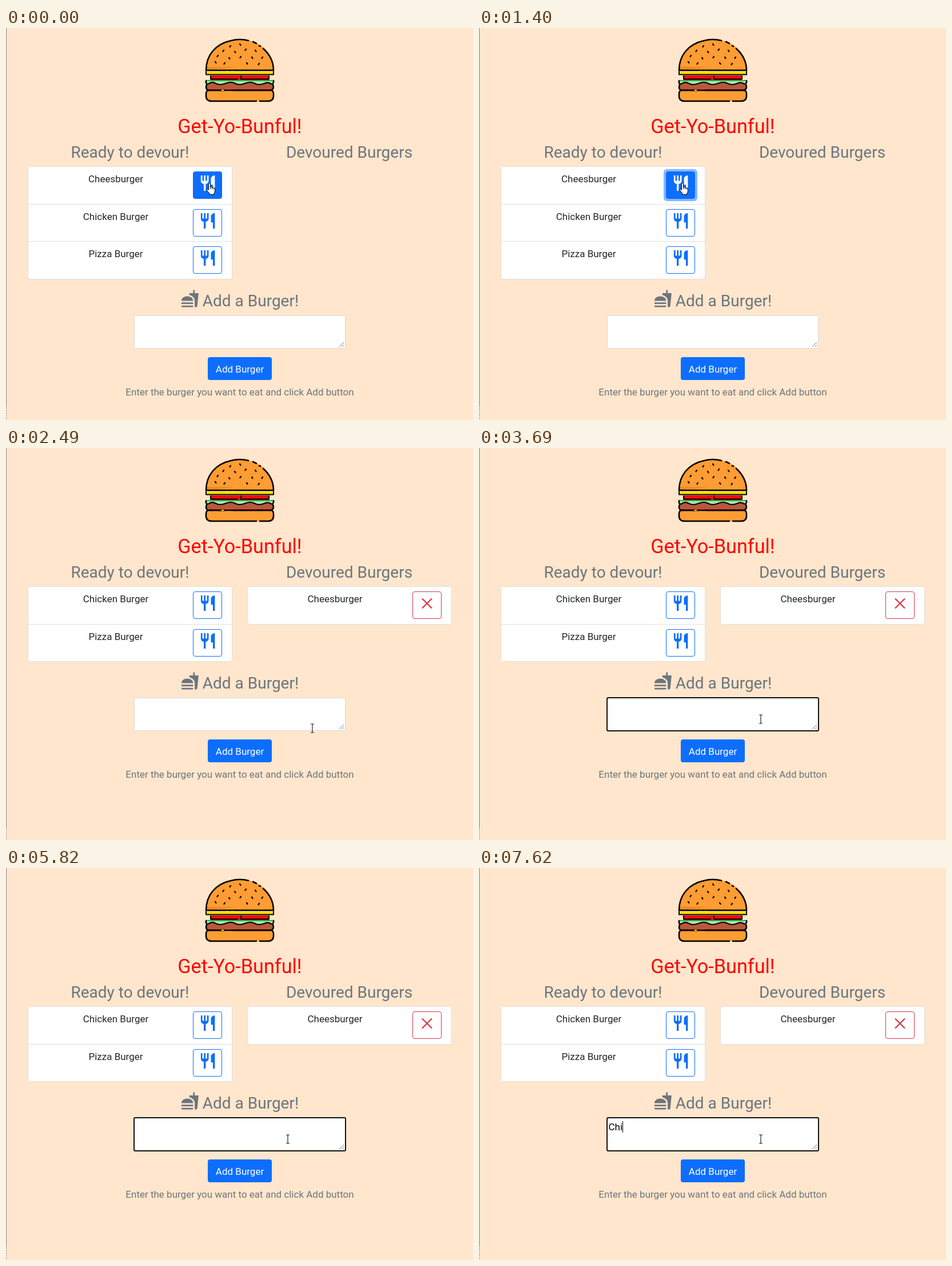
An HTML page for the animation above (8 s loop, 817 px wide and 686 px high).

```html
<!DOCTYPE html>
<html lang="en">
<head>
<meta charset="utf-8">
<title>Burger list</title>
<style>
  html, body { margin: 0; width: 100%; height: 100%; overflow: hidden; background: #ffe6cc; }
  svg { display: block; }
  text { font: 17px Roboto, Arial, sans-serif; fill: #212529; text-anchor: middle; }
  .h1 { font-size: 34.2px; fill: #f00; }
  .h2 { font-size: 28px; fill: #6c757d; }
  .hint { fill: #6c757d; }
  .card { fill: #fff; stroke: #dfdfdf; }
  .eat rect { fill: #fff; stroke: #0d6efd; }
  .eat path { fill: #0d6efd; }
  .eat.hot rect { fill: #0d6efd; }
  .eat.hot path { fill: #fff; }
  .ink { fill: none; stroke: #000; stroke-width: 2.6; stroke-linecap: round; stroke-linejoin: round; }
</style>
</head>
<body>
<svg width="817" height="686" viewBox="0 0 817 686">
  <path d="M.5 0V664" stroke="#857d78"/>
  <path d="M.5 665V686" stroke="#857d78" stroke-dasharray="2 2"/>

  <g id="burger">
    <path d="M350 74C349 44 373 20 409 20S469 44 468 74Z" fill="#ff9c33"/>
    <path d="M351 68H400Q380 72 351 73Z" fill="#f08a24"/>
    <path d="M350 76H468V82H350Z" fill="#ffe000"/>
    <path d="M358 83H460V91H358Z" fill="#f20d0d"/>
    <path d="M350 91H468V97H350Z" fill="#22b04a"/>
    <path d="M352 93H466V98H352Z" fill="#a9e6ae"/>
    <path d="M351 99Q359 92 367 97T384 97T401 97T418 97T435 97T452 97T467 99V109H351Z" fill="#b9573b"/>
    <path d="M354 110H464Q468 110 468 115V119Q468 128 458 128H360Q350 128 350 119V115Q350 110 354 110Z" fill="#ff9c33"/>
    <g class="ink">
      <path d="M424 22Q409 18 394 22C366 28 350 48 350 74H468C468 57 460 45 450 36M432 24L438 27M443 31L445 32"/>
      <path d="M350 76V81.5H468V76M358 84V89.5H405M411 84V89.5H460V84" stroke-width="2"/>
      <path d="M350 92Q348 98 354 98Q360 93 367 97T384 97T401 97T418 97T435 97T452 97Q459 94 464 98Q470 97 468 92" stroke-width="2.2"/>
      <path d="M351 99Q348 108 355 109H388M397 109H463Q470 107 467 99"/>
      <path d="M383 109H354Q350 110 350 115V119Q350 128 360 128H438M444 128H458Q468 128 468 119V115Q468 110 464 109H390"/>
    </g>
    <path d="M384 76H390M394 76H399M377 109H381" stroke="#ffe000" stroke-width="2"/>
    <path id="seeds" class="ink" style="stroke-width:2.2"/>
  </g>

  <text class="h1" x="409" y="184">Get-Yo-Bunful!</text>
  <text class="h2" x="217" y="227">Ready to devour!</text>
  <text class="h2" x="600.5" y="227">Devoured Burgers</text>

  <g id="ready"></g>

  <g id="devoured">
    <rect class="card" x="422.5" y="242.5" width="357" height="66" rx="4"/>
    <text x="575.5" y="270">Cheesburger</text>
    <rect x="711.5" y="251.5" width="50" height="47" rx="3.5" fill="#fff" stroke="#dc3545"/>
    <path d="M728 263.5L745 280.5M745 263.5L728 280.5" stroke="#dc3545" stroke-width="2.3"/>
  </g>

  <g id="form">
    <path transform="translate(305.6 391.2) scale(1.36)" fill="#6c757d" d="M18.06 23h1.66c.84 0 1.53-.64 1.63-1.46L23 5.05h-5V1h-1.97v4.05h-4.97l.3 2.34c1.71.47 3.31 1.32 4.27 2.26 1.44 1.42 2.43 2.89 2.43 5.29zM1 22V21h15.03v1q0 1-1 1H2q-1 0-1-1zm15.03-7c0-8-15.03-8-15.03 0zM1 17h15v2H1z"/>
    <text class="h2" x="428" y="421">Add a Burger!</text>
    <rect x="224.5" y="437.5" width="369" height="57" fill="#fff" stroke="#dadada"/>
    <path d="M583 492L591 484M588 492L591 489" stroke="#777"/>
    <rect id="outline" x="224" y="437" width="370" height="58" rx="2" fill="none" stroke="#101010" stroke-width="2"/>
    <rect x="353" y="510" width="112" height="40" rx="4" fill="#0d6efd"/>
    <text x="409" y="537" style="fill:#fff">Add Burger</text>
    <text class="hint" x="409" y="577">Enter the burger you want to eat and click Add button</text>
  </g>

  <text id="typed" x="226.5" y="459" style="text-anchor:start;fill:#000"></text>
  <rect id="caret" y="443" width="1" height="20"/>

  <g id="mouse">
    <path id="hand" fill="#fff" stroke="#000" stroke-linejoin="round" d="M-1.6 1.5Q0-.8 1.6 1.5V7.4Q3.8 6 4.6 8Q6.6 7 7.4 9Q9.5 8.6 9.5 11V14Q9.5 17 7.6 18.5V20.5H0V18.5Q-2 16.5-4.6 13Q-5.6 11-3.4 11L-1.6 12.5ZM1.6 7.4V11M4.6 8V11M7.4 9V11.5"/>
    <path id="arrow" fill="#fff" stroke="#000" d="M.5 .5V14.5L3.6 11.6 5.8 16.5 7.8 15.6 5.7 10.9H10.5Z"/>
    <path id="beam" fill="none" stroke="#222" stroke-width="1.2" d="M-3-7.5H-1Q0-7.5 0-6.5V6.5Q0 7.5-1 7.5H-3M3-7.5H1Q0-7.5 0-6.5M0 6.5Q0 7.5 1 7.5H3"/>
  </g>
</svg>
<script>
const $ = id => document.getElementById(id);
const show = (id, on) => $(id).style.display = on ? '' : 'none';

const LOOP = 8000, EATEN = 1550, FOCUS = 3150, ROW = 65.5;
const CUTLERY = 'M11 9H9V2H7v7H5V2H3v7c0 2.12 1.66 3.84 3.75 3.97V22h2.5v-9.03C11.34 12.84 13 11.12 13 9V2h-2zm5-3v8h2.5v8H21V2c-2.76 0-5 2.24-5 4z';
const MENU = ['Cheesburger', 'Chicken Burger', 'Pizza Burger'];

// start time, pointer shape, hotspot
const MOVES = [
  [0, 'hand', 356, 271],
  [1980, 'arrow', 540, 345], [2100, 'arrow', 716, 414],
  [2250, 'arrow', 655, 455], [2370, 'arrow', 598, 480],
  [2490, 'beam', 536, 490.5], [2640, 'beam', 518, 489], [2760, 'beam', 499, 488],
  [2910, 'beam', 495, 480], [3030, 'beam', 493, 474.5]
];
const TYPING = [[0, ''], [7100, 'C'], [7220, 'Ch'], [7620, 'Chi']];
const BLINKS = [[3150, 3690], [4250, 4840], [5270, 5820], [6410, 6960], [7100, LOOP]];

const SEEDS = [[393, 31], [409, 28], [381, 39], [400, 41], [420, 37], [436, 39], [371, 48], [390, 52],
  [411, 50], [430, 51], [449, 51], [366, 59], [383, 61], [421, 61], [443, 62]];
$('seeds').setAttribute('d', SEEDS.map(([x, y], i) => `M${x} ${y}l${i % 2 ? 1.5 : -1.5} 2`).join(''));

function list(items) {
  const y = i => Math.round(i * ROW);
  return `<rect class="card" x="38.5" y="242.5" width="357" height="${y(items.length)}" rx="3.5"/>` +
    items.map((name, i) => `<g transform="translate(0 ${y(i)})">
      ${i ? '<path d="M39 242.5H396" stroke="#dfdfdf"/>' : '<rect id="ring" x="323" y="247" width="59" height="56" rx="6" fill="#86b7fe"/>'}
      <text x="192" y="270">${name}</text>
      <g class="eat"><rect x="327.5" y="251.5" width="50" height="47" rx="3.5"/>
      <path transform="translate(336.8 255.2) scale(1.36)" d="${CUTLERY}"/></g></g>`).join('');
}

const latest = (steps, t) => steps.filter(s => s[0] <= t).pop();
let shown;

function draw(now) {
  const t = now % LOOP, eaten = t >= EATEN;
  if (shown !== eaten) {
    $('ready').innerHTML = list(eaten ? MENU.slice(1) : MENU);
    shown = eaten;
  }
  document.querySelector('.eat').classList.toggle('hot', !eaten || t >= 1670 && t < 1980);
  show('ring', t >= 1400 && !eaten);
  show('devoured', eaten);
  $('form').setAttribute('transform', `translate(0 ${eaten ? 0 : Math.round(ROW)})`);
  show('outline', t >= FOCUS);

  $('typed').textContent = latest(TYPING, t)[1];
  $('caret').setAttribute('x', Math.floor(227 + $('typed').getComputedTextLength()));
  show('caret', BLINKS.some(([on, off]) => t >= on && t < off));

  const [, shape, x, y] = latest(MOVES, t);
  ['hand', 'arrow', 'beam'].forEach(id => show(id, id === shape));
  $('mouse').setAttribute('transform', `translate(${x} ${y})`);
  requestAnimationFrame(() => draw(performance.now()));
}
draw(performance.now());
</script>
</body>
</html>
```
